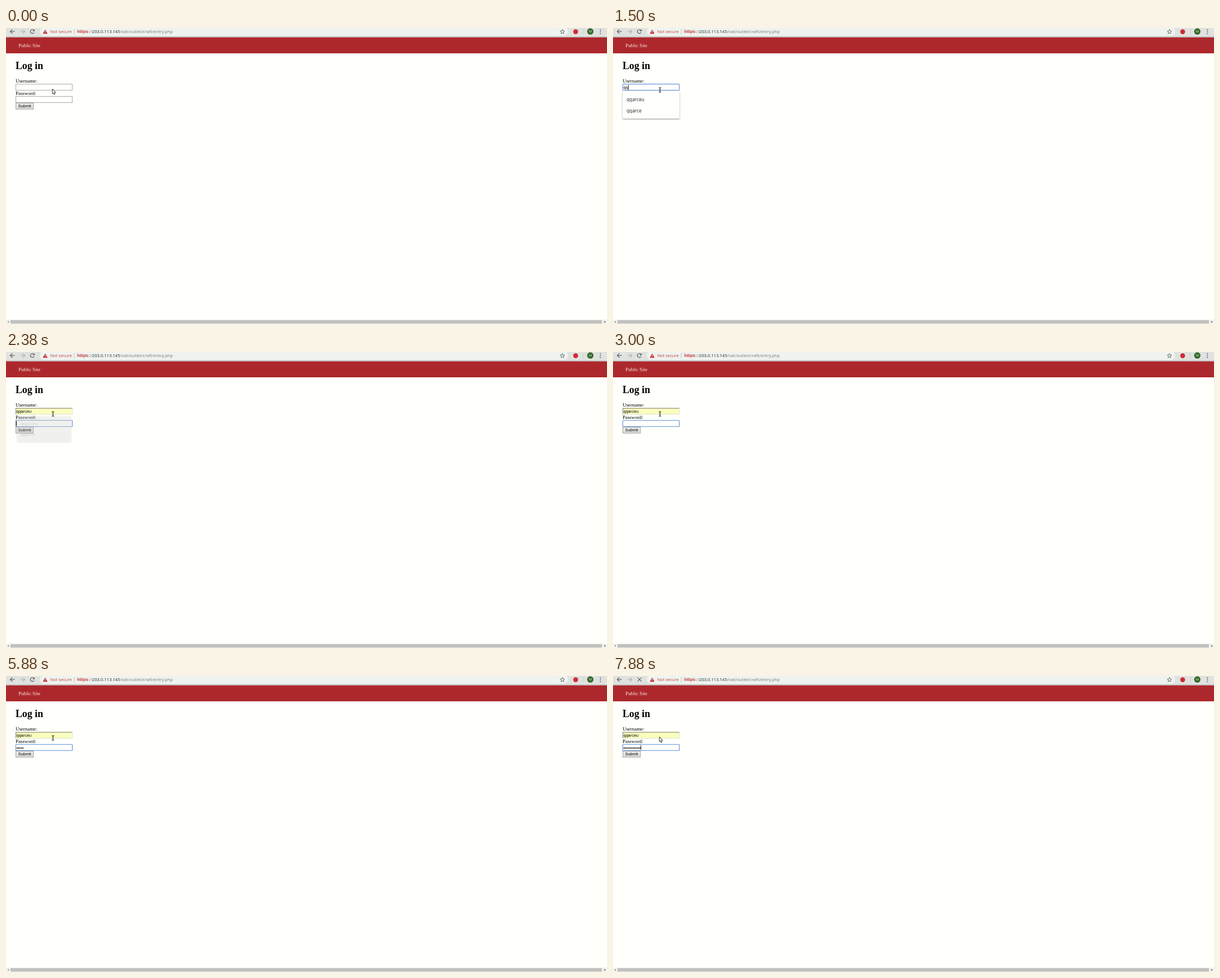
An HTML page with a canvas for the animation above (8000 ms loop, 1066x526 px).

```html
<!DOCTYPE html>
<html lang="en">
<head>
<meta charset="utf-8">
<title>Log in</title>
<style>
html, body { margin: 0; width: 100%; height: 100%; overflow: hidden; background: #fffffc; }
canvas { display: block; }
</style>
</head>
<body>
<canvas id="stage" width="1066" height="526"></canvas>
<script>
const ctx = document.getElementById('stage').getContext('2d');
const LOOP = 8000;
const SERIF = '"Liberation Serif", serif';
const SANS = '"Liberation Sans", sans-serif';
const UI = '"Open Sans", "Noto Sans", sans-serif';
const PAGE = '#fffffc';

const USER = 'qqarceu';
const ALL = [USER, 'lmodren47', 'mlorvek000@wavesmail.example', '"', '"OR"1"#', 'owner'];
const MATCHES = [USER, 'qqarce'];

// Step tables: [start ms, value]
const NAME = [[0, ''], [1380, 'q'], [1500, 'qq'], [2000, USER]];
const DOTS = [[0, 0], [3500, 1], [4000, 2], [4130, 3], [4750, 4], [5250, 5],
  [6380, 6], [6500, 7], [7130, 8], [7500, 9], [7630, 11], [7750, 12]];
const CARET = [[0, false], [500, true], [1000, false], [1380, true], [2000, false],
  [2380, true], [3000, false], [3500, true], [5880, false], [6380, true]];
const FOCUS = [[0, ''], [500, 'name'], [2380, 'pass']];
const POPUP = [[0, 0], [500, 1], [2250, 0.65], [2380, 0.16], [2500, 0]];
const POINTER = [[0, 'arrow'], [250, 'beam'], [7880, 'arrow']];

function at(steps, t) {
  let value = steps[0][1];
  for (const [start, v] of steps) if (t >= start) value = v;
  return value;
}

function rect(x, y, w, h, color) {
  ctx.fillStyle = color;
  ctx.fillRect(x, y, w, h);
}

function text(str, x, y, font, color, align = 'left') {
  ctx.font = font;
  ctx.fillStyle = color;
  ctx.textAlign = align;
  ctx.fillText(str, x, y);
}

function disc(x, y, r, color) {
  ctx.fillStyle = color;
  ctx.beginPath();
  ctx.arc(x, y, r, 0, Math.PI * 2);
  ctx.fill();
}

function path(points, closed) {
  ctx.beginPath();
  points.forEach(([x, y]) => ctx.lineTo(x, y));
  if (closed) ctx.closePath();
}

function line(points, color, width = 1) {
  path(points);
  ctx.strokeStyle = color;
  ctx.lineWidth = width;
  ctx.stroke();
}

function navArrow(x, dir, color) {
  line([[x - 4 * dir, 6.2], [x + 4 * dir, 6.2]], color, 1.1);
  line([[x, 2.4], [x + 4 * dir, 6.2], [x, 10]], color, 1.1);
}

function reloadIcon() {
  ctx.beginPath();
  ctx.arc(46.8, 6.2, 3.4, 0.5, Math.PI * 1.8);
  ctx.strokeStyle = '#555855';
  ctx.lineWidth = 1.1;
  ctx.stroke();
  path([[50.8, 2.2], [50.8, 5.8], [47.2, 5.8]], true);
  ctx.fillStyle = '#555855';
  ctx.fill();
}

function stopIcon() {
  line([[43.6, 2.8], [50.4, 9.6]], '#555855', 1.1);
  line([[50.4, 2.8], [43.6, 9.6]], '#555855', 1.1);
}

function star(cx, cy) {
  const points = [];
  for (let i = 0; i < 10; i++) {
    const a = -Math.PI / 2 + i * Math.PI / 5;
    const r = i % 2 ? 1.9 : 4.1;
    points.push([cx + r * Math.cos(a), cy + r * Math.sin(a)]);
  }
  path(points, true);
  ctx.strokeStyle = '#5a5d5a';
  ctx.lineWidth = 0.9;
  ctx.stroke();
}

function toolbar(loading) {
  rect(0, 0, 1066, 15.5, '#e0e2df');
  rect(0, 15.3, 1066, 1.4, '#b2b3b0');
  ctx.fillStyle = '#eff3ef';
  ctx.beginPath();
  ctx.roundRect(60, -2, 937, 16, 8);
  ctx.fill();

  navArrow(11.5, -1, '#555855');
  navArrow(29.5, 1, '#adafac');
  loading ? stopIcon() : reloadIcon();

  path([[69.5, 2.8], [73.7, 10.3], [65.3, 10.3]], true);
  ctx.fillStyle = '#c5282c';
  ctx.fill();
  rect(69.1, 5.3, 0.9, 2.4, '#fff');
  rect(69.1, 8.4, 0.9, 0.9, '#fff');

  const font = '7.6px ' + UI;
  text('Not secure', 78.4, 9.4, font, '#c43a3c');
  rect(120.6, 2, 0.9, 9, '#b9bcb9');
  text('https', 126, 9.4, '8.1px ' + UI, '#c43a3c');
  rect(126, 6.4, 20, 0.9, '#c43a3c');
  text('://', 145.8, 9.4, font, '#777b78');
  text('203.0.113.145', 152.8, 9.4, font, '#252826');
  text('/oat/outlet/craft/entry.php', 202.2, 9.4, font, '#747976');

  star(987, 6.7);
  disc(1010.4, 6.6, 4.3, '#cf2a36');
  rect(1023.6, 2, 0.8, 9, '#c9cbc8');
  disc(1036.4, 6.2, 5.6, '#33692b');
  text('M', 1036.4, 8.4, '6px ' + UI, '#d9e6d6', 'center');
  for (const y of [3, 6.4, 9.8]) disc(1054.3, y, 0.95, '#555855');
}

function scrollbar() {
  rect(0, 518, 1066, 8, '#f1f1ee');
  rect(8, 519.2, 1049, 6, '#c0c0be');
  path([[5, 520.4], [5, 524], [2.6, 522.2]], true);
  ctx.fillStyle = '#8a8a88';
  ctx.fill();
  path([[1061.4, 520.4], [1061.4, 524], [1063.8, 522.2]], true);
  ctx.fillStyle = '#4a4a48';
  ctx.fill();
}

function field(y, focused, filled) {
  rect(17, y, 101, 12, filled ? '#faffbd' : '#fffffe');
  if (focused) {
    ctx.beginPath();
    ctx.roundRect(17.4, y + 0.5, 100.2, 11, 1);
    ctx.strokeStyle = '#6795d8';
    ctx.lineWidth = 1.2;
    ctx.stroke();
  } else if (filled) {
    rect(17, y + 11, 101, 1, '#e2e4cf');
    rect(117, y, 1, 12, '#e2e4cf');
    rect(17, y + 0.3, 100.5, 1.1, '#85857c');
    rect(17, y + 0.3, 1.1, 11, '#85857c');
  } else {
    ctx.strokeStyle = '#a9a9a7';
    ctx.lineWidth = 1;
    ctx.strokeRect(17.5, y + 0.5, 100, 11);
  }
}

function button() {
  const fill = ctx.createLinearGradient(0, 133, 0, 145);
  fill.addColorStop(0, '#f1f1ef');
  fill.addColorStop(1, '#d8d8d6');
  rect(17, 133, 32, 11.6, fill);
  ctx.strokeStyle = '#a5a5a3';
  ctx.lineWidth = 1;
  ctx.strokeRect(17.5, 133.5, 31, 10.6);
  text('Submit', 33, 141.4, '7.4px ' + SANS, '#000', 'center');
}

function caret(offset, y) {
  rect(Math.round(18.3 + offset), y, 1, 8.5, '#222');
}

function form(t) {
  const name = at(NAME, t);
  const focus = at(FOCUS, t);
  const font = '7.4px ' + SANS;
  const label = '8.88px ' + SERIF;
  const dots = '\u2022'.repeat(at(DOTS, t));
  const blink = at(CARET, t);

  text('Log in', 17, 73, 'bold 17.77px ' + SERIF, '#000');
  text('Username:', 17, 97.2, label, '#000');
  text('Password:', 17, 118.9, label, '#000');
  field(99.2, focus === 'name', name === USER);
  field(121, focus === 'pass', false);
  text(name, 18.4, 107.8, font, '#000');
  text(dots, 18.4, 129.6, font, '#000');
  button();

  ctx.font = font;
  if (blink && focus === 'name') caret(ctx.measureText(name).width, 101.2);
  if (blink && focus === 'pass') caret(at(DOTS, t) * 2.59, 122.8);
}

function popup(t) {
  const alpha = at(POPUP, t);
  if (!alpha) return;
  const narrow = t >= 1380;
  const rows = narrow ? MATCHES : ALL;
  const w = narrow ? 101 : 160.5;
  const h = rows.length * 20 + 9.2;
  const scale = 0.94 + 0.06 * Math.min(1, alpha + 0.08);

  ctx.save();
  ctx.globalAlpha = alpha;
  ctx.translate(17 + w / 2, 111.6 + h / 2);
  ctx.scale(scale, scale);
  ctx.translate(-17 - w / 2, -111.6 - h / 2);
  ctx.shadowColor = 'rgba(0,0,0,0.45)';
  ctx.shadowBlur = 2;
  ctx.shadowOffsetY = 0.7;
  rect(17, 111.8, w, h, '#fffffe');
  ctx.shadowColor = 'transparent';
  if (t >= 2000) rect(17, 116.2, w, 20, '#e9e9e7');
  rows.forEach((row, i) => text(row, 24, 129.6 + i * 20, '8.3px ' + UI, '#222'));
  ctx.restore();
}

function pointer(kind) {
  if (kind === 'beam') {
    line([[83.3, 106.4], [83.3, 113.6]], '#222', 1.2);
    for (const y of [106, 114]) line([[81.2, y], [85.4, y]], '#222', 1);
    return;
  }
  path([[82.4, 108.2], [82.4, 117], [84.3, 115.3], [85.6, 118.3],
    [87, 117.7], [85.7, 114.8], [88.1, 114.4]], true);
  ctx.fillStyle = '#fff';
  ctx.fill();
  ctx.strokeStyle = '#222';
  ctx.lineWidth = 0.9;
  ctx.stroke();
}

function draw(t) {
  rect(0, 0, 1066, 526, PAGE);
  toolbar(t >= 7880);
  rect(0, 16.7, 1066, 28.3, '#ad282c');
  text('Public Site', 22.2, 34.3, '8.88px ' + SERIF, '#fbeeec');
  form(t);
  popup(t);
  pointer(at(POINTER, t));
  scrollbar();
}

const begin = performance.now();
function tick() {
  draw((performance.now() - begin) % LOOP);
  requestAnimationFrame(tick);
}
tick();
</script>
</body>
</html>
```
